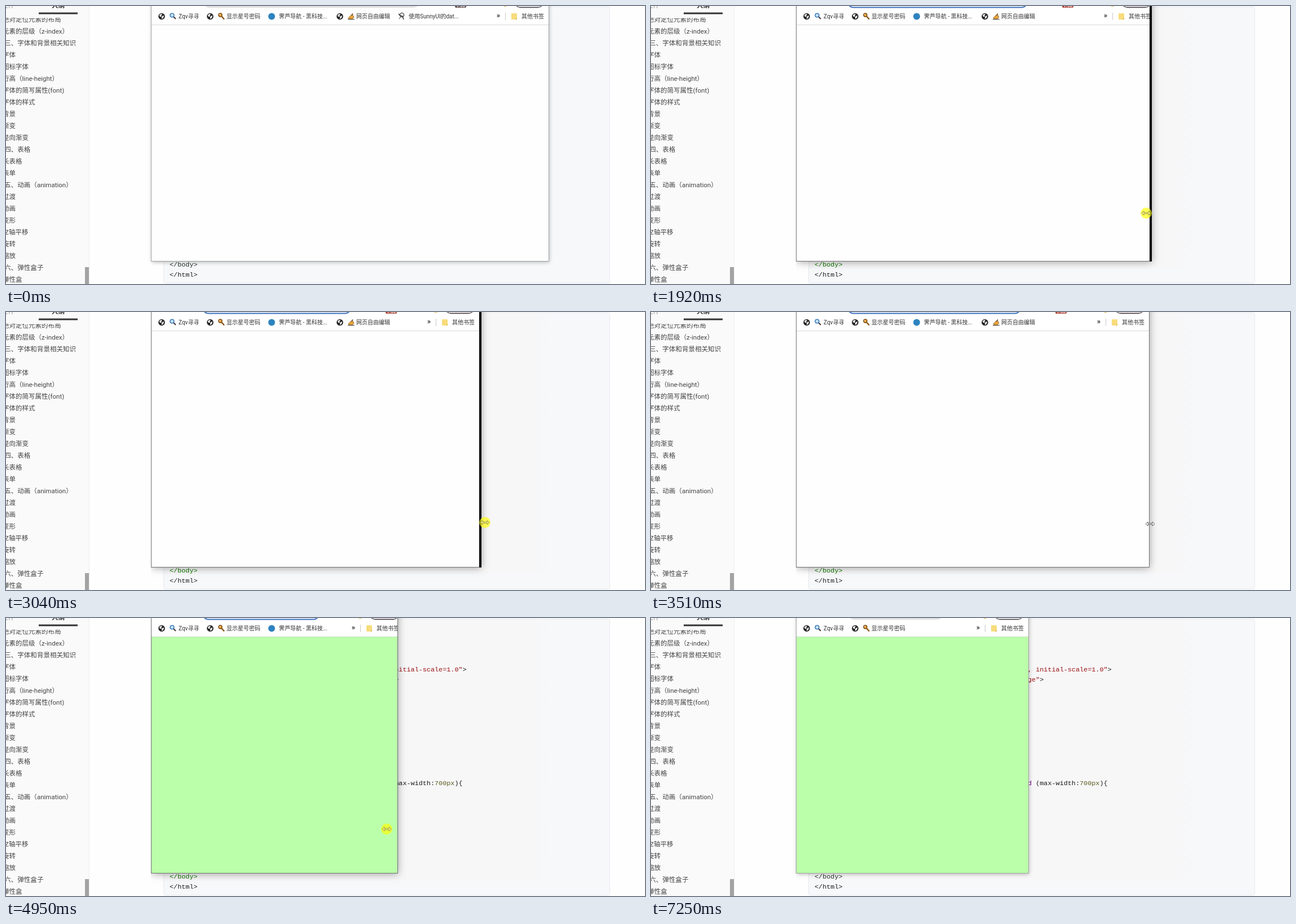
Animation, 1133 px wide and 494 px high, one loop 7310 ms. Source, as an HTML page with a canvas:

```html
<!DOCTYPE html>
<html lang="zh-CN">
<head>
<meta charset="utf-8">
<style>
html, body { margin: 0; width: 100%; height: 100%; overflow: hidden; background: #fefefe; }
canvas { display: block; }
</style>
</head>
<body>
<canvas id="stage" width="1133" height="494"></canvas>
<script>
const ctx = document.getElementById('stage').getContext('2d');
const LOOP = 7310, LEFT = 258, BOTTOM = 453.5, FOCUS = 1490, BLUR = 7250;
const SANS = 'Roboto, "Noto Sans CJK SC", "Noto Sans CJK JP", sans-serif';
const MONO = '"Liberation Mono", "DejaVu Sans Mono", monospace';

// Pointer tracks; keys are [time, x, y]. Tracks with a grip also drag the window edge.
const tracks = [
  { from: 0, to: 0, steps: 1, shape: 'none', keys: [[0, 0, 0]] },
  { from: 190, to: 880, steps: 11, shape: 'arrow', keys: [[190, 1068, 455], [400, 1030, 420], [880, 971, 366]] },
  { from: 880, to: 880, steps: 1, shape: 'none', keys: [[880, 0, 0]] },
  { from: 940, to: 1090, steps: 3, shape: 'resize', keys: [[940, 967, 371], [1090, 965, 370]] },
  { from: 1490, to: 2180, steps: 11, shape: 'press', grip: 2, keys: [[1490, 964, 370], [1640, 957, 369],
    [1844, 897, 368], [1869, 889, 368], [1904, 878, 368], [2035, 834, 371], [2110, 814, 374]] },
  { from: 2310, to: 2310, steps: 1, shape: 'resize', keys: [[2310, 814, 374]] },
  { from: 2840, to: 3510, steps: 9, shape: 'press', grip: 2, keys: [[2840, 814, 374], [2947, 841, 374],
    [2972, 844, 374], [3007, 849, 374], [3200, 876, 375], [3440, 885, 376.5]] },
  { from: 3510, to: 3510, steps: 1, shape: 'resize', keys: [[3510, 885, 376.5]] },
  { from: 3710, to: 3800, steps: 2, shape: 'resize', keys: [[3710, 885, 379], [3800, 884, 380]] },
  { from: 4200, to: 4270, steps: 2, shape: 'resize', keys: [[4200, 883, 378], [4270, 883, 376]] },
  { from: 4670, to: 5350, steps: 11, shape: 'press', grip: 0, keys: [[4670, 883, 374], [4745, 855, 374],
    [4882, 705, 374], [4907, 694, 374], [4942, 675, 375], [5080, 645, 375], [5270, 638, 375]] },
  { from: 5480, to: 5890, steps: 6, shape: 'arrow', keys: [[5480, 638, 374], [5650, 618, 330], [5890, 594, 281]] },
  { from: 6160, to: 6580, steps: 7, shape: 'arrow', keys: [[6160, 597, 284], [6300, 690, 345], [6510, 945, 485], [6580, 970, 515]] }
];

const outline = ['元素的层级（z-index）', '三、字体和背景相关知识', '字体', '图标字体', '行高（line-height）',
  '字体的简写属性(font)', '字体的样式', '背景', '渐变', '径向渐变', '四、表格', '长表格', '表单',
  '五、动画（animation）', '过渡', '动画', '变形', 'Z轴平移', '旋转', '缩放', '六、弹性盒子', '弹性盒'];

const bookmarks = [
  { x: 306, end: 341, label: 'Zqv寻寻', icons: [[globe, 276], [magnifier, 296]] },
  { x: 391, end: 451, label: '显示星号密码', icons: [[globe, 362], [key, 382]] },
  { x: 484, end: 571, label: '霁芦导航 - 黑科技...', icons: [[blueDot, 471]] },
  { x: 621, end: 681, label: '网页自由编辑', icons: [[globe, 592], [writing, 612]] },
  { x: 714, end: 807, label: '使用SunnyUI的dat...', icons: [[sketch, 701]] }
];

function at(keys, t) {
  if (t <= keys[0][0]) return keys[0];
  for (let i = 1; i < keys.length; i++) {
    const a = keys[i - 1], b = keys[i];
    if (t <= b[0]) {
      const k = (t - a[0]) / (b[0] - a[0]);
      return [t, a[1] + (b[1] - a[1]) * k, a[2] + (b[2] - a[2]) * k];
    }
  }
  return keys[keys.length - 1];
}

function stepTime(track, t) {
  if (track.steps < 2) return track.from;
  const gap = (track.to - track.from) / (track.steps - 1);
  return track.from + Math.min(track.steps - 1, Math.floor((t - track.from) / gap + 1e-6)) * gap;
}

// The frame trails the pointer, and the page layout trails the frame.
function edges(t) {
  const drag = tracks.filter(k => 'grip' in k && k.from <= t).pop();
  if (!drag) return { frame: 962, layout: 962 };
  const now = stepTime(drag, t);
  const edge = lag => Math.max(669, Math.round(at(drag.keys, now - lag)[1] - drag.grip));
  return { frame: edge(35), layout: edge(60) };
}

// y is the middle of the line; the baseline snaps to a whole pixel.
function text(str, x, y, size, color, family = SANS, weight = '') {
  ctx.font = `${weight} ${size}px ${family}`;
  ctx.fillStyle = color;
  ctx.fillText(str, x, Math.round(y + size * .37));
}

function rect(x, y, w, h, color) {
  ctx.fillStyle = color;
  ctx.fillRect(x, y, w, h);
}

function paint(fill, stroke, width = 1) {
  if (fill) { ctx.fillStyle = fill; ctx.fill(); }
  if (stroke) { ctx.strokeStyle = stroke; ctx.lineWidth = width; ctx.stroke(); }
}

function shape(points, fill, stroke, width) {
  ctx.beginPath();
  points.forEach(([x, y]) => ctx.lineTo(x, y));
  ctx.closePath();
  paint(fill, stroke, width);
}

function line(points, color, width) {
  ctx.beginPath();
  points.forEach(([x, y]) => ctx.lineTo(x, y));
  paint(null, color, width);
}

function disc(x, y, r, fill, stroke, width) {
  ctx.beginPath();
  ctx.arc(x, y, r, 0, Math.PI * 2);
  paint(fill, stroke, width);
}

function rounded(x, y, w, h, r, fill, stroke, width) {
  ctx.beginPath();
  ctx.roundRect(x, y, w, h, r);
  paint(fill, stroke, width);
}

function globe(x) {
  disc(x, 18.5, 5.8, '#262626');
  shape([[x - 4, 16], [x - 1, 14], [x + 1, 15], [x - 1, 17], [x, 19], [x - 3, 19]], '#fff');
  shape([[x + 1, 18], [x + 4, 17], [x + 3, 21], [x, 23], [x, 20.5]], '#fff');
}

function magnifier(x) {
  line([[x + 1, 19], [x + 5, 23]], '#4a3a35', 2.2);
  disc(x - 1.5, 16.5, 3.4, '#bfe0f5', '#2f6fae', 1.4);
}

function key(x) {
  line([[x - 1, 17], [x + 5, 23.5]], '#8a5418', 2.4);
  disc(x - 2, 16, 3, '#e8a33a', '#7a4a14', 1.4);
  disc(x - 3, 15, .8, '#fff');
}

function blueDot(x) { disc(x, 18.5, 6, '#2e83bf'); }

function writing(x) {
  line([[x - 3, 21], [x + 3, 13.5]], '#5a4630', 1.6);
  shape([[x - 5, 21], [x - 1, 17], [x + 3, 16], [x + 5, 20], [x + 2, 23], [x - 4, 23]], '#e6a43c', '#8a5a20', .8);
  line([[x - 6, 23.7], [x + 6, 23.7]], '#333', 1);
}

function sketch(x) {
  disc(x + 1, 16, 3.6, null, '#444', 1.4);
  line([[x - 5, 14], [x - 2, 17], [x + 2, 18], [x + 4, 24]], '#333', 1.4);
  line([[x - 4, 23], [x - 1, 19]], '#666', 1.2);
}

function drawSidebar() {
  rect(0, 0, 147, 494, '#fafafa');
  rect(147, 0, 1, 494, '#ececec');
  const size = 11.52;
  ctx.save();
  ctx.beginPath();
  ctx.rect(0, 21, 140, 473);
  ctx.clip();
  text('绝对定位元素的布局', -6, 23.5, size, '#4a4a4a');
  outline.forEach((label, i) => {
    const x = label[1] === '、' ? -2.7 : label[0] === 'Z' ? -2 : -6;
    text(label, x, 44.5 + 21 * i, size, '#444');
  });
  ctx.restore();
  text('文件', -8, -1, size, '#888');
  text('大纲', 81, -1, size, '#333', SANS, 'bold');
  rect(58, 11.5, 69, 3, '#333');
  rect(140, 464, 7, 30, '#a3a3a3');
}

function code(parts, x, y) {
  for (const [str, color] of parts) {
    text(str, x, y, 11.8, color, MONO);
    x += ctx.measureText(str).width;
  }
}

function drawEditor(t) {
  rounded(279.5, 1.5, 791, 491, 3, '#f6f8fa', '#e7eaed');
  if (t >= FOCUS) {
    const tint = ctx.createLinearGradient(930, 0, 975, 0);
    tint.addColorStop(0, '#f7f7f8');
    tint.addColorStop(1, '#f6f8fa');
    rect(281, 2, 694, 463, tint);
  }
  const red = '#981010', ink = '#1a1a1a';
  code([[', initial-scale=1.0"', red], ['>', ink]], 668, 90.5);
  code([['ge"', red], ['>', ink]], 668, 109);
  code([['d', '#708'], [' (max-width:', ink], ['700px', '#5a5a1e'], ['){', ink]], 668, 293);
  code([['</body>', t >= FOCUS && t < BLUR ? '#170' : '#243024']], 290, 458.5);
  code([['</html>', ink]], 290, 477);
}

function drawToolbar(w, active) {
  const wide = w > 760;
  const barEnd = w - (wide ? 227 : 149);
  if (active) rounded(349, -22, barEnd - 350, 24.5, 10, '#fff', '#3b6fbd', 2);
  else rounded(350, -22, barEnd - 352, 25, 10, '#e1e1e3');
  if (wide) {
    rounded(w - 166, -9, 20, 12, 2, active ? '#b0493d' : '#66504f');
    text('1.50', w - 164, -1, 8, '#fff', SANS, 'bold');
  }
  disc(w - 77, -4, 5, '#dba52d');
  rounded(w - 59.5, -20, 50, 22.5, 9, active ? '#f3e6ea' : '#f5f5f7', '#3c3a40', 1.3);
}

function drawBookmarks(w) {
  for (const b of bookmarks) {
    if (b.end > w - 100) break;
    b.icons.forEach(([icon, x]) => icon(x));
    text(b.label, b.x, 18.5, 10, '#333');
  }
  text('»', w - 92, 17, 12, '#222', SANS, 'bold');
  rect(w - 77, 12, 1, 13, '#c9c9c9');
  rounded(w - 66, 13, 10, 11, 1, '#f8dc7c');
  shape([[w - 59, 24], [w - 56, 21], [w - 56, 24]], '#d9b34a');
  text('其他书签', w - 48, 18.5, 10, '#333');
}

function castShadow(frame, active) {
  ctx.save();
  if (active) {
    ctx.beginPath();
    ctx.rect(LEFT - 1, 0, 875, 494);
    ctx.clip();
  }
  ctx.shadowColor = active ? 'rgba(0,0,0,.36)' : 'rgba(0,0,0,.3)';
  ctx.shadowBlur = active ? 13 : 7;
  ctx.shadowOffsetX = ctx.shadowOffsetY = 1;
  rect(LEFT, -30, frame - LEFT, BOTTOM + 30, '#fff');
  ctx.restore();
}

function drawWindow(t) {
  const { frame, layout } = edges(t);
  const active = t >= FOCUS && t < BLUR;
  const gap = Math.abs(frame - layout);
  const strip = gap > 1 && gap <= 10 ? 3 : 0;
  const green = layout <= 818;

  castShadow(frame, active);
  ctx.save();
  ctx.beginPath();
  ctx.rect(LEFT, 0, frame - strip - LEFT, BOTTOM);
  ctx.clip();
  rect(LEFT, 0, 720, 34, '#fff');
  rect(LEFT, 34, 720, 420, green ? '#bbffaa' : '#fefefe');
  rect(LEFT, 33, 720, 1, green ? '#c5dfbd' : '#d9d9d9');
  drawToolbar(layout, active);
  drawBookmarks(layout);
  ctx.restore();

  ctx.strokeStyle = active ? '#707070' : '#a4a4a4';
  ctx.lineWidth = 1;
  ctx.strokeRect(LEFT - .5, -30.5, frame - LEFT + 1, BOTTOM + 30.5);
  if (strip) rect(frame - strip, 0, strip + 1, BOTTOM + .5, '#000');
}

function drawPointer(t) {
  const track = tracks.filter(k => k.from <= t).pop();
  const [, x, y] = at(track.keys, stepTime(track, t));
  const place = points => points.map(([dx, dy]) => [x + dx, y + dy]);
  if (track.shape === 'none') return;
  if (track.shape === 'arrow') {
    shape(place([[0, 0], [0, 12], [2.8, 9.5], [4.8, 14], [6.6, 13.2], [4.8, 9], [8.6, 9]]), '#fff', '#222', .8);
    return;
  }
  const pressed = track.shape === 'press';
  if (pressed) disc(x, y, 9.8, 'rgba(255,255,0,.65)');
  shape(place([[-8, 0], [-4, -3.6], [-4, -1], [4, -1], [4, -3.6], [8, 0], [4, 3.6], [4, 1], [-4, 1], [-4, 3.6]]),
    pressed ? '#f4f283' : '#fff', pressed ? '#858035' : '#333', .8);
}

function render(now) {
  const t = now % LOOP;
  rect(0, 0, 1133, 494, '#fefefe');
  drawEditor(t);
  drawSidebar();
  drawWindow(t);
  drawPointer(t);
}

let start;
function tick(now) {
  start ??= now;
  render(Math.max(0, now - start));
  requestAnimationFrame(tick);
}
render(0);
requestAnimationFrame(tick);
</script>
</body>
</html>
```
